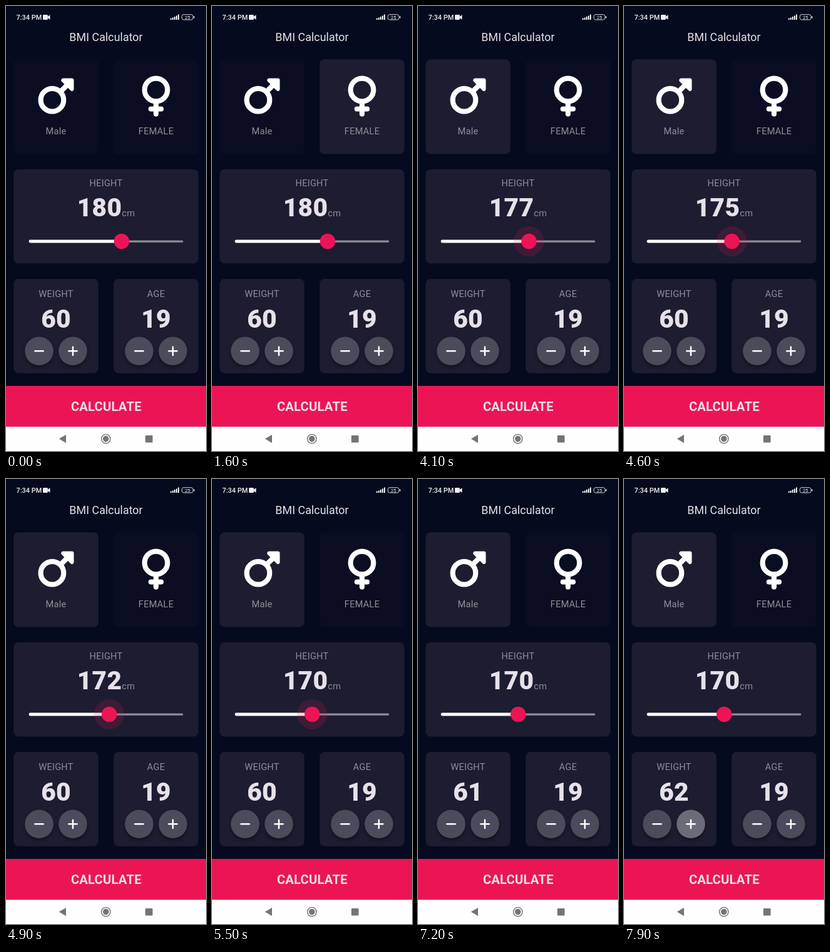
An HTML page for the animation above (8 s loop, 320 by 711 pixels).

```html
<!DOCTYPE html>
<html lang="en">
<head>
<meta charset="utf-8">
<title>BMI Calculator</title>
<style>
  html, body { margin: 0; width: 100%; height: 100%; overflow: hidden; background: #050a1e; }
  svg { display: block; width: 100vw; height: 100vh; font-family: Roboto, sans-serif; }
  text { text-anchor: middle; }
  .card { fill: #1d1c31; }
  .label { font-size: 14.67px; letter-spacing: .2px; fill: #8d8e98; }
  .num { font-size: 40.75px; font-weight: 900; letter-spacing: .2px; fill: #e6e1e8; }
  .icon { fill: none; stroke: #fff; stroke-width: 64; stroke-linecap: round; }
  .btn { fill: #4b4c5b; filter: drop-shadow(0 3.5px 2.5px rgba(0, 0, 0, .4)); }
  .sign { stroke: #fff; stroke-width: 2.5; stroke-linecap: round; }
</style>
</head>
<body>
<svg viewBox="0 0 320 711" preserveAspectRatio="none">
  <defs>
    <g id="minus">
      <circle class="btn" r="22.8"/>
      <path class="sign" d="M-6.6 0H6.6"/>
    </g>
    <g id="plus">
      <use href="#minus"/>
      <path class="sign" d="M0-6.6V6.6"/>
    </g>
  </defs>
  <rect width="320" height="711" fill="#050a1e"/>

  <!-- status bar -->
  <g fill="#f1f1f4">
    <text x="16.5" y="22" font-size="10.9" font-weight="500" style="text-anchor:start">7:34 PM</text>
    <rect x="59" y="14" width="7.8" height="8" rx="1.2"/>
    <path d="M66.5 17L70.5 14.3V21.7L66.5 19z"/>
    <path d="M263 19.6h2V22h-2zM266 18.4h2V22h-2zM269 17h2V22h-2zM272 15.4h2V22h-2zM275 13.6h2V22h-2z"/>
    <rect x="281.5" y="13.7" width="17.5" height="8.3" rx="2.6" fill="none" stroke="#d5d5dc"/>
    <path d="M300 16.2h.8a.7.7 0 0 1 .7.7v2a.7.7 0 0 1-.7.7H300z"/>
    <text x="290.3" y="20.6" font-size="7.6">25</text>
  </g>
  <text x="160" y="56.2" font-size="17.93" fill="#e6e1e8">BMI Calculator</text>

  <!-- gender cards -->
  <rect class="card" id="male" x="12.2" y="85.2" width="135.6" height="151.3" rx="8"/>
  <rect class="card" id="female" x="172.2" y="85.2" width="135.6" height="151.3" rx="8"/>
  <g class="icon" transform="translate(51.5 111.5) scale(.1273)">
    <circle cx="176" cy="304" r="144"/>
    <path d="M290 190L362 118" stroke-linecap="butt"/>
    <path d="M312 32H424a24 24 0 0 1 24 24V168a24 24 0 0 1-41 17L295 73A24 24 0 0 1 312 32z" fill="#fff" stroke="none"/>
  </g>
  <g class="icon" transform="translate(215.6 111.5) scale(.1273)">
    <circle cx="192" cy="176" r="144"/>
    <path d="M192 330V480M128 416H256"/>
  </g>
  <text class="label" x="80" y="204.6">Male</text>
  <text class="label" x="240" y="204.6">FEMALE</text>

  <!-- height -->
  <rect class="card" x="12.2" y="260.9" width="295.6" height="150.7" rx="8"/>
  <text class="label" x="160" y="287.6">HEIGHT</text>
  <text x="160" y="336.3"><tspan class="num" id="height">180</tspan><tspan class="label">cm</tspan></text>
  <rect x="37" y="374.4" width="246.5" height="3.3" rx="1.6" fill="#8d8e98"/>
  <rect id="track" x="36.5" y="373.6" height="4.9" rx="2.4" fill="#fff"/>
  <g id="thumb" fill="#eb1555">
    <circle id="halo" opacity=".16"/>
    <circle r="12.2"/>
  </g>

  <!-- weight and age -->
  <rect class="card" x="12.2" y="435.9" width="135.6" height="150.8" rx="8"/>
  <rect class="card" x="172.2" y="435.9" width="135.6" height="150.8" rx="8"/>
  <text class="label" x="80" y="464.6">WEIGHT</text>
  <text class="label" x="240" y="464.6">AGE</text>
  <text class="num" id="weight" x="80" y="513.5">60</text>
  <text class="num" x="240" y="513.5">19</text>
  <use href="#minus" x="53" y="551.3"/>
  <use href="#plus" x="107" y="551.3"/>
  <use href="#minus" x="213" y="551.3"/>
  <use href="#plus" x="267" y="551.3"/>
  <circle id="glow" cx="107" cy="551.3" r="22.8" fill="#fff"/>

  <rect y="607" width="320" height="66" fill="#eb1555"/>
  <text x="160.3" y="646.7" font-size="20.37" font-weight="700" letter-spacing=".1" fill="#e9e2e9">CALCULATE</text>

  <!-- navigation bar -->
  <rect y="672.3" width="320" height="38.7" fill="#fefefe"/>
  <g fill="#747474">
    <path d="M84.8 691.6L96 685V698.2z"/>
    <circle cx="159.8" cy="691.6" r="7.2" fill="none" stroke="#747474" stroke-width="1.4"/>
    <circle cx="159.8" cy="691.6" r="4.8"/>
    <rect x="223" y="686" width="11.6" height="11.6" rx="1"/>
  </g>
</svg>
<script>
  const LOOP = 8000;
  const $ = id => document.getElementById(id);

  // Each row is [start in ms, value], held until the next row.
  const gender = [[0, ''], [400, 'male'], [1400, 'female'], [2500, 'male']];
  const height = [[0, 180], [3500, 182], [4000, 180], [4100, 177], [4200, 174], [4300, 172],
    [4400, 171], [4500, 173], [4600, 175], [4700, 174], [4800, 173], [4900, 172], [5100, 171], [5300, 170]];
  const halo = [[0, 0], [3600, 18], [3700, 24.2], [5800, 16], [5900, 0]];
  const weight = [[0, 60], [7100, 61], [7500, 62]];
  const glow = [[0, 0], [7100, .18], [7200, 0], [7400, .1], [7500, .18], [7600, .08],
    [7700, 0], [7800, .1], [7900, .18]];

  const at = (steps, t) => steps.filter(s => s[0] <= t).pop()[1];

  function draw(t) {
    const active = at(gender, t);
    for (const id of ['male', 'female']) $(id).style.fill = id === active ? '#1d1c31' : '#0b0e22';

    const cm = at(height, t);
    const x = 37 + 2.465 * (cm - 120);
    $('height').textContent = cm;
    $('track').setAttribute('width', x - 36.5);
    $('thumb').setAttribute('transform', `translate(${x} 376)`);
    $('halo').setAttribute('r', at(halo, t));

    $('weight').textContent = at(weight, t);
    $('glow').setAttribute('opacity', at(glow, t));
    // Keep the plus sign crisp above the highlight.
    $('glow').style.mixBlendMode = 'screen';
  }

  let start;
  function tick(now) {
    start ??= now;
    draw((now - start) % LOOP);
    requestAnimationFrame(tick);
  }
  draw(0);
  requestAnimationFrame(tick);
</script>
</body>
</html>
```
